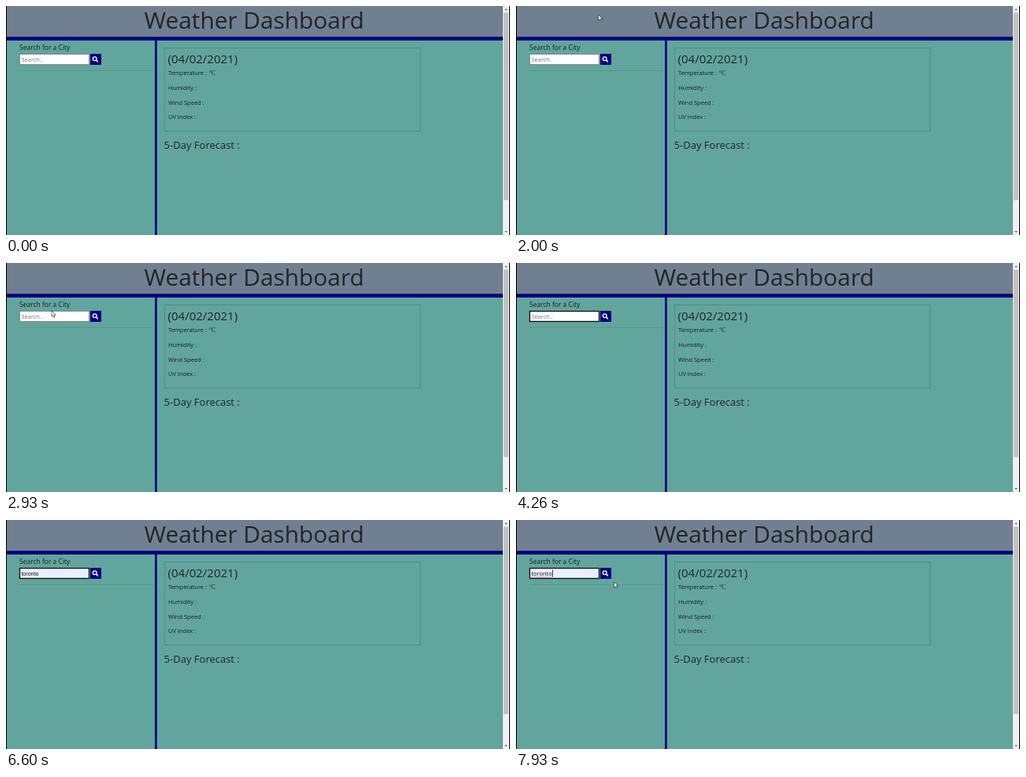
An HTML page that plays this animation: 640x292 px, repeating every 8 s.

```html
<!DOCTYPE html>
<html lang="en">
<head>
<meta charset="utf-8">
<title>Weather Dashboard</title>
<style>
  html, body { margin: 0; width: 100%; height: 100%; overflow: hidden; background: #62a59d; }
  svg { display: block; width: 100%; height: 100%; }
  text { font-family: "Open Sans", "Noto Sans", sans-serif; fill: #16201f; white-space: pre; }
  .head { fill: #212529; }
  .label { font-size: 7.5px; }
  .navy { fill: #000080; }
</style>
</head>
<body>
<svg viewBox="0 0 640 292" preserveAspectRatio="none">
  <rect width="640" height="292" fill="#62a59d"/>
  <rect width="632" height="40" fill="#708090"/>
  <rect class="navy" y="39.3" width="631" height="4.7"/>
  <rect class="navy" x="189" y="43" width="2.7" height="249"/>
  <text class="head" x="175.6" y="29" font-size="29.8">Weather Dashboard</text>

  <text x="17" y="56" font-size="8.5">Search for a City</text>
  <rect x="17" y="82" width="170" height=".6" fill="#000" opacity=".16"/>
  <rect id="field" x="17.5" y="61.5" width="88" height="13"/>
  <text id="entry" x="19.4" y="70.6"></text>
  <path id="squiggle" d="M19.5 73H46" stroke="#e03030" stroke-width=".8" stroke-dasharray="1.4 .5"/>
  <rect id="caret" y="63.6" width=".8" height="9" fill="#111"/>
  <rect class="navy" x="107" y="61" width="14" height="14"/>
  <g fill="none" stroke="#fff" stroke-linecap="round">
    <circle cx="112.7" cy="67.2" r="2.4" stroke-width="1.3"/>
    <path d="M114.7 69.2L116.4 70.9" stroke-width="1.6"/>
  </g>

  <rect x="201.5" y="53.5" width="324.5" height="106" fill="none" stroke="#507f7d" stroke-width=".7"/>
  <text class="head" x="205.6" y="73" font-size="15">(04/02/2021)</text>
  <g class="label">
    <text x="206" y="88.4">Temperature :</text>
    <text x="258" y="88.4" style="font-family:'Liberation Serif',serif">°C</text>
    <text x="206" y="107.1">Humidity :</text>
    <text x="206" y="125.8">Wind Speed :</text>
    <text x="206" y="144.4">UV Index :</text>
  </g>
  <text class="head" x="200.6" y="181.7" font-size="13">5-Day Forecast :</text>

  <rect x="631" width="8" height="292" fill="#f1f1f1"/>
  <rect x="632" y="8.5" width="6" height="239" fill="#c1c1c1"/>
  <path d="M633.3 5.2l1.7-2 1.7 2zM633.3 287l1.7 2 1.7-2z" fill="#555"/>
  <path d="M0 0h1v292H0zM639 0h1v292h-1z" fill="#000"/>

  <path id="pointer" d="M0 0V7.2L1.7 5.7 2.8 8.2 4 7.7 2.9 5.2H5.1Z" fill="#fff" stroke="#111" stroke-width=".6" stroke-linejoin="round"/>
</svg>
<script>
const LOOP = 8000, FPS = 15;
const FOCUS = 3730, PREVIEW = 6600, COMMIT = 7455, BLINK = 1067;
const $ = id => document.getElementById(id);
const [field, entry, squiggle, caret, pointer] =
  ["field", "entry", "squiggle", "caret", "pointer"].map($);

// Pointer trips as [ms, x, y] stops; hidden outside each trip.
const trips = [
  [[66, 500, 219], [266, 446, 165], [800, 446, 165], [1067, 431.5, 151], [1350, 300, 82],
   [1600, 170, 18], [1667, 170, 18], [2000, 104.5, 11], [2300, 84, 32], [2533, 66, 62],
   [2600, 66, 62], [2733, 61, 76], [2933, 58, 61], [3134, 58, 61], [3260, 56, 64]],
  [[7520, 100, 85], [7700, 118, 84], [7933, 124.5, 79], [8001, 124.5, 79]]
];

function pointerAt(t) {
  const trip = trips.find(p => t >= p[0][0] && t < p[p.length - 1][0]);
  if (!trip) return null;
  const i = trip.findIndex(p => p[0] > t);
  const a = trip[i - 1], b = trip[i];
  const u = (t - a[0]) / (b[0] - a[0]);
  return [a[1] + (b[1] - a[1]) * u, a[2] + (b[2] - a[2]) * u];
}

const set = (el, attrs) => { for (const k in attrs) el.setAttribute(k, attrs[k]); };
const show = (el, on) => set(el, { visibility: on ? "visible" : "hidden" });

function draw(t) {
  const focused = t >= FOCUS, filled = t >= PREVIEW, done = t >= COMMIT;
  set(field, {
    fill: filled ? "#e8f0fe" : "#fff",
    stroke: focused ? "#101010" : "#767f7f",
    "stroke-width": focused ? 1.3 : .8
  });

  const word = filled ? "toronto" : "Search..";
  if (entry.textContent !== word) entry.textContent = word;
  entry.style.fill = filled ? "#111" : "#757575";
  entry.style.fontSize = filled && !done ? "7.1px" : "7.5px";
  entry.style.fontFamily = filled && !done ? "'Liberation Sans', sans-serif" : "";

  show(squiggle, done);
  set(caret, { x: done ? 46.1 : 19.4 });
  show(caret, done || focused && (t - FOCUS) % BLINK < BLINK / 2 - 5);

  const p = pointerAt(Math.floor((t + 7) * FPS / 1000) * 1000 / FPS);
  show(pointer, p);
  if (p) set(pointer, { transform: `translate(${p[0]} ${p[1]})` });
}

const start = performance.now();
function tick() {
  draw((performance.now() - start) % LOOP);
  requestAnimationFrame(tick);
}
draw(0);
requestAnimationFrame(tick);
</script>
</body>
</html>
```
